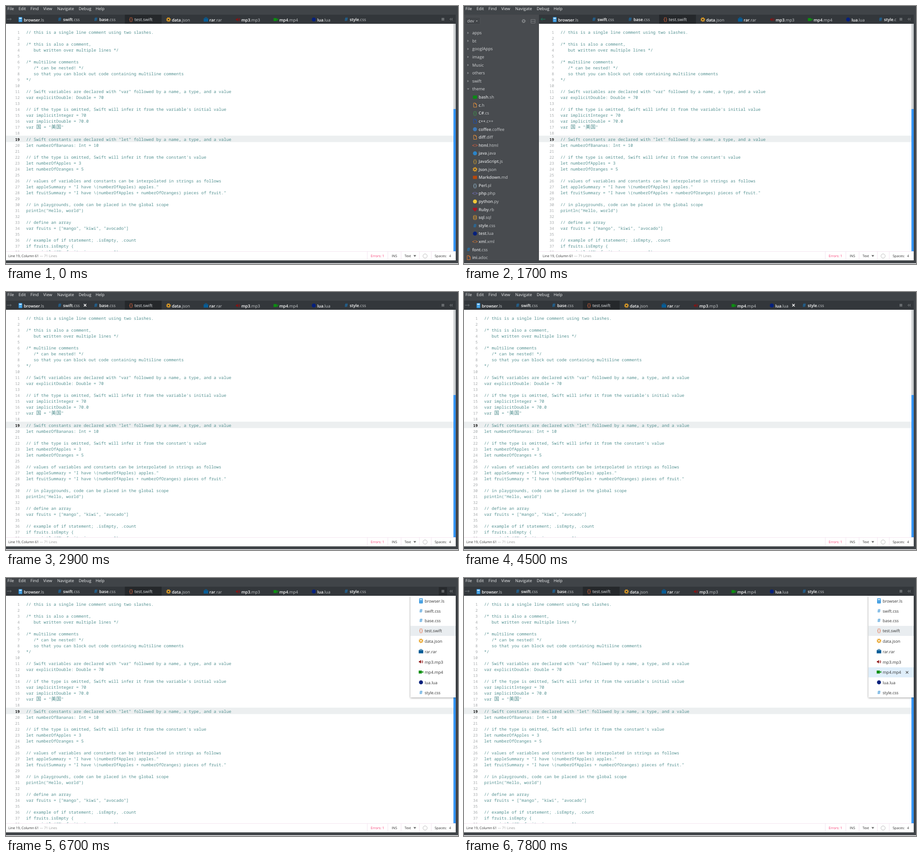
These frames come from a looping animation (989x566 px, 8 s). An HTML page:

```html
<!DOCTYPE html>
<html lang="en">
<head>
<meta charset="utf-8">
<title>Code editor</title>
<style>
  html, body { margin: 0; width: 100%; height: 100%; overflow: hidden; background: #fff; }
  svg { display: block; }
  text { font: 9px "Open Sans", "Noto Sans", sans-serif; white-space: pre; text-rendering: geometricPrecision; }
  .name { font-weight: 600; fill: #fff; }
  .ext { font-weight: 400; fill: #c9ccce; }
  .tree { font-size: 9.2px; fill: #d4d6d8; }
  .status { font-size: 7.5px; }
  .code { font: 9.15px "Noto Sans Mono", monospace; fill: #559292; }
  .num { font: 8.4px "Noto Sans Mono", monospace; text-anchor: end; fill: #a4a8aa; }
  .cjk { font: 11px "Noto Sans CJK SC", "Noto Sans CJK", sans-serif; }
  .glyph { font-size: 11.5px; text-anchor: middle; }
</style>
</head>
<body>
<svg id="stage" width="989" height="566" viewBox="0 0 989 566"></svg>
<script>
const STEP = 100, LOOP = 8000, SHIFT = 167, SIDEBAR = 164;
const FRAME = '#404448', BAR = '#33373b';

const rect = (x, y, w, h, fill, more = '') =>
  `<rect x="${x}" y="${y}" width="${w}" height="${h}" fill="${fill}" ${more}/>`;
const path = (d, stroke, width = 1, fill = 'none') =>
  `<path d="${d}" stroke="${stroke}" stroke-width="${width}" fill="${fill}"/>`;
const text = (x, y, str, cls = '', more = '') =>
  `<text x="${x}" y="${y}" class="${cls}" ${more}>${str}</text>`;
const dot = (r, fill) => `<circle r="${r}" fill="${fill}"/>`;
const ring = (r, c, w, dash = '') =>
  `<circle r="${r}" fill="none" stroke="${c}" stroke-width="${w}" stroke-dasharray="${dash}"/>`;
const at = (x, y, body) => `<g transform="translate(${x} ${y})">${body}</g>`;
const cross = (x, y, color, width) =>
  at(x, y, path('M-2.7-2.7L2.7 2.7M-2.7 2.7L2.7-2.7', color, width));

const shapes = {
  dot: c => dot(4.4, c),
  gear: c => ring(2.7, c, 1.8) + ring(4.2, c, 1.8, '1.65 1.65'),
  doc: c => path('M-3-4.5H1L3.5-2V4.5H-3ZM1-4.5V-2H3.5', c),
  block: c => rect(-4.5, -3.5, 9, 7, c),
  server: c => rect(-4, -5.5, 8, 11, c, 'rx="1"') + rect(-2.8, -4, 5.6, 2.5, '#d8efff') +
    path('M-2.5 1H2.5M-2.5 3H2.5', '#8cc8f4', .8),
  case: c => rect(-5, -2.5, 10, 7, c) + path('M-2-2.5V-4.3H2V-2.5', c, 1.2),
  speaker: c => path('M-4.5-1.5H-2.5L0-4V4L-2.5 1.5H-4.5Z', 'none', 0, c) +
    path('M1.5-2Q3 0 1.5 2M3-3.3Q5.3 0 3 3.3', c),
  camera: c => rect(-5, -3.2, 7, 6.4, c) + path('M2 0L5-2.8V2.8Z', 'none', 0, c),
  heart: c => path('M0 4.5L-4.5 0C-6-4-1.5-5.5 0-2.5C1.5-5.5 6-4 4.5 0Z', 'none', 0, c),
  db: c => rect(-3.5, -4.5, 7, 9, 'none', `stroke="${c}" rx="2"`) + path('M-3.5-1.6H3.5M-3.5 1.6H3.5', c),
};
const icon = (kind, color, x, y) => at(x, y, shapes[kind] ? shapes[kind](color)
  : text(0, 4, kind, 'glyph', `fill="${color}"`));

const split = file => {
  const i = file.lastIndexOf('.');
  return `${file.slice(0, i)}<tspan class="ext">${file.slice(i)}</tspan>`;
};

// file, icon, colour, text x in the tab bar
const files = [
  ['browser.ls', 'server', '#2f93dc', 39], ['swift.css', '#', '#1681cf', 125],
  ['base.css', '#', '#1681cf', 204], ['test.swift', '{}', '#e2663c', 281],
  ['data.json', 'gear', '#e8a225', 363], ['rar.rar', 'case', '#075d97', 445],
  ['mp3.mp3', 'speaker', '#8c1010', 515], ['mp4.mp4', 'camera', '#0c8f10', 598],
  ['lua.lua', 'dot', '#06207c', 681], ['style.css', '#', '#1681cf', 752],
];
const ACTIVE = 3;
const rowTops = [40, 62, 83, 105, 127, 150, 173, 196, 218, 241, 262];

const folders = 'apps bt googlApps image Music others swift theme'.split(' ');
const treeFiles = [
  ['bash.sh', 'block', '#0a8a14'], ['c.h', 'doc', '#e8923c'], ['C#.cs', '{}', '#3f9a4a'],
  ['c++.c++', 'doc', '#1c4fb4'], ['coffee.coffee', 'dot', '#3c78b8'], ['diff.diff', 'doc', '#e8923c'],
  ['html.html', '&lt;&gt;', '#e8603c'], ['java.java', 'dot', '#2b84c8'], ['JavaScript.js', '{}', '#e0a82c'],
  ['Json.json', 'gear', '#e8a225'], ['Markdown.md', 'block', '#b8480c'], ['Perl.pl', '{}', '#9cc4dc'],
  ['php.php', '&lt;&gt;', '#7c78d0'], ['python.py', 'dot', '#f0c838'], ['Ruby.rb', 'heart', '#a81424'],
  ['sql.sql', 'db', '#e09a2c'], ['style.css', '#', '#1681cf'], ['test.lua', 'dot', '#06207c'],
  ['xml.xml', '&lt;&gt;', '#e87c2c'], ['font.css', '#', '#1681cf'], ['ini.adoc', 'doc', '#e8782c'],
];

const code = `// this is a single line comment using two slashes.

/* this is also a comment,
   but written over multiple lines */

/* multiline comments
   /* can be nested! */
   so that you can block out code containing multiline comments
*/

// Swift variables are declared with "var" followed by a name, a type, and a value
var explicitDouble: Double = 70

// if the type is omitted, Swift will infer it from the variable's initial value
var implicitInteger = 70
var implicitDouble = 70.0
var 国 = "美国"

// Swift constants are declared with "let" followed by a name, a type, and a value
let numberOfBananas: Int = 10

// if the type is omitted, Swift will infer it from the constant's value
let numberOfApples = 3
let numberOfOranges = 5

// values of variables and constants can be interpolated in strings as follows
let appleSummary = "I have \\(numberOfApples) apples."
let fruitSummary = "I have \\(numberOfApples + numberOfOranges) pieces of fruit."

// in playgrounds, code can be placed in the global scope
println("Hello, world")

// define an array
var fruits = ["mango", "kiwi", "avocado"]

// example of if statement; .isEmpty, .count
if fruits.isEmpty {
    println("No fruits in my array.")`.split('\n');

const codeLines = code.map((line, i) => {
  const y = 60.8 + i * 13.04;
  const current = i === 18 ? 'style="font-weight:600;fill:#111"' : '';
  return text(30, y, i + 1, 'num', current) +
    text(44, y, line.replace(/[美国]+/g, '<tspan class="cjk">$&</tspan>'), 'code');
}).join('');

const menuBar = [['File', 3], ['Edit', 27.5], ['Find', 53.5], ['View', 81.5], ['Navigate', 112],
  ['Debug', 159], ['Help', 196]].map(([s, x]) => text(x, 8.6, s, '', 'fill="#eceeef"')).join('');

const statusRight = rect(785, 539, 199, 19, '#fff') +
  [790, 835, 864, 904, 930].map(x => rect(x, 539, 1, 19, '#f4e4f0')).join('') +
  text(798, 551.3, 'Errors: 1', 'status', 'fill="#f83c74"') +
  [['INS', 844], ['Text', 872], ['Spaces:', 938], ['4', 969.5]]
    .map(([s, x]) => text(x, 551.3, s, 'status', 'fill="#333"')).join('') +
  path('M891.5 546.5H897.5L894.5 550.5Z', 'none', 0, '#666') + at(917, 548.5, ring(4.6, '#bbb', 1));

const sidebar = (() => {
  const row = i => 59 + i * 17.61;
  let out = rect(0, 19, SIDEBAR, 539, '#484b4f') +
    rect(2.5, 24.5, 33, 16, '#424549', 'stroke="#505357" rx="2"') + text(7, 36, 'dev', 'tree') +
    path('M26 32H30L28 34.5Z', 'none', 0, '#aaa') +
    at(130.5, 33, ring(2.4, '#a4a7a9', 1) + ring(3.7, '#a4a7a9', 1.2, '1.4 1.5')) +
    path('M146.5 29.5H155.5V37.5H146.5ZM146.5 33.5H155.5', '#888b8e', .8);
  folders.forEach((name, i) => {
    const arrow = name === 'theme' ? 'M-2.5-1.5H2.5L0 1.5Z' : 'M-1.5-2.5V2.5L1.5 0Z';
    out += at(9, row(i), path(arrow, 'none', 0, '#8c9093')) + text(18, row(i) + 3.2, name, 'tree');
  });
  treeFiles.forEach(([file, kind, color], i) => {
    const x = i < 19 ? 32 : 18, y = row(i + folders.length);
    out += icon(kind, color, x - 8, y) + text(x, y + 3.2, split(file), 'tree name');
  });
  return out;
})();

function tabAt(step) {
  if (step === 8 || step === 9) return 0;
  if (step >= 29 && step < 36) return 4 - Math.abs(step - 32);
  if (step === 36 || step === 37) return 0;
  return step >= 38 && step <= 45 ? step - 37 : -1;
}

function tabs(step) {
  const hovered = tabAt(step);
  let out = rect(260, 19, 80.5, 20, '#25282b');
  if (step >= 8 && step < 17) out += rect(17, 19, 86, 20, '#393538');
  files.forEach(([file, kind, color, x], i) => {
    const y = shapes[kind] ? 30.4 : 29.3;
    const label = i === ACTIVE
      ? text(x, y + 3.2, file, '', 'fill="#dfe2e4" style="font-size:9.4px"')
      : text(x, y + 3.2, split(file), 'name');
    out += icon(kind, color, x - 7.5, y - .7) + label;
    if (i === hovered) out += cross((files[i + 1] || [0, 0, 0, 831])[3] - 31, 29, '#fff', 1.5);
  });
  return out;
}

function dropdown(step) {
  if (step < 65) return '';
  const hovered = step < 72 ? -1 : Math.min(step - 71, 7);
  let out = rect(885, 39, 99, 223, '#fff', 'style="filter:drop-shadow(0 1px 2px #0006)"');
  files.forEach(([file, kind, color], i) => {
    const top = rowTops[i], h = rowTops[i + 1] - top, y = top + h / 2;
    const fill = i === hovered ? '#dfeefa' : i === ACTIVE ? '#e9edf0' : '#fff';
    out += rect(885, top, 99, h, fill) + icon(kind, color, 908, y - .7) +
      text(916, y + 3.3, file, '', 'fill="#333"');
    if (i === hovered) out += cross(969.5, y, '#444', 1.1);
  });
  return `<g opacity="${[.4, .8][step - 65] || 1}">${out}</g>`;
}

function scene(step) {
  const open = step >= 17 && step < 29;
  const left = open ? SIDEBAR : 0, shift = open ? SHIFT : 0;
  const arrow = open ? path('M178 29H168.5M171.5 26L168.5 29L171.5 32', '#168a62')
    : path('M2 29H11.5M9 26.7L11.5 29L9 31.3', step >= 11 && step < 17 ? '#8d9794' : '#747b7e');
  return `<clipPath id="tabs"><rect x="${left + 14}" y="19" width="${932 - left}" height="20"/></clipPath>
    <clipPath id="page"><rect x="${left}" y="39" width="${979 - left}" height="499"/></clipPath>` +
    rect(0, 0, 989, 564.5, FRAME) + menuBar +
    rect(left, 19, 984 - left, 20, BAR) +
    `<g clip-path="url(#tabs)">${at(shift, 0, tabs(step))}</g>` + arrow +
    (step >= 49 && step < 72 ? rect(947, 20, 18, 18, '#272a2d') : '') +
    path('M953 27H959M953 29H959M953 31H959', '#a6aaac', .9) +
    path('M973.5 26.5L971.5 29L973.5 31.5M977 26.5L975 29L977 31.5', '#a6aaac', .9) +
    rect(left, 39, 984 - left, 519, '#fff') +
    `<g clip-path="url(#page)">${rect(left, 284.5, 979 - left, 14, '#eceff0')}${at(shift, 0, codeLines)}</g>` +
    rect(979, 39, 5, 187, '#cdd0d2') + rect(979, 226, 5, 312, '#3595f4') +
    rect(left, 538, 984 - left, 1, '#f4e4f0') +
    text(5 + shift, 551.3, 'Line 19, Column 61<tspan fill="#999"> — 71 Lines</tspan>', 'status', 'fill="#333"') +
    statusRight + (open ? sidebar : '') + dropdown(step);
}

const stage = document.getElementById('stage');
let shown = -1;
function tick() {
  const step = Math.floor(performance.now() % LOOP / STEP);
  if (step !== shown) stage.innerHTML = scene(shown = step);
  requestAnimationFrame(tick);
}
tick();
</script>
</body>
</html>
```
